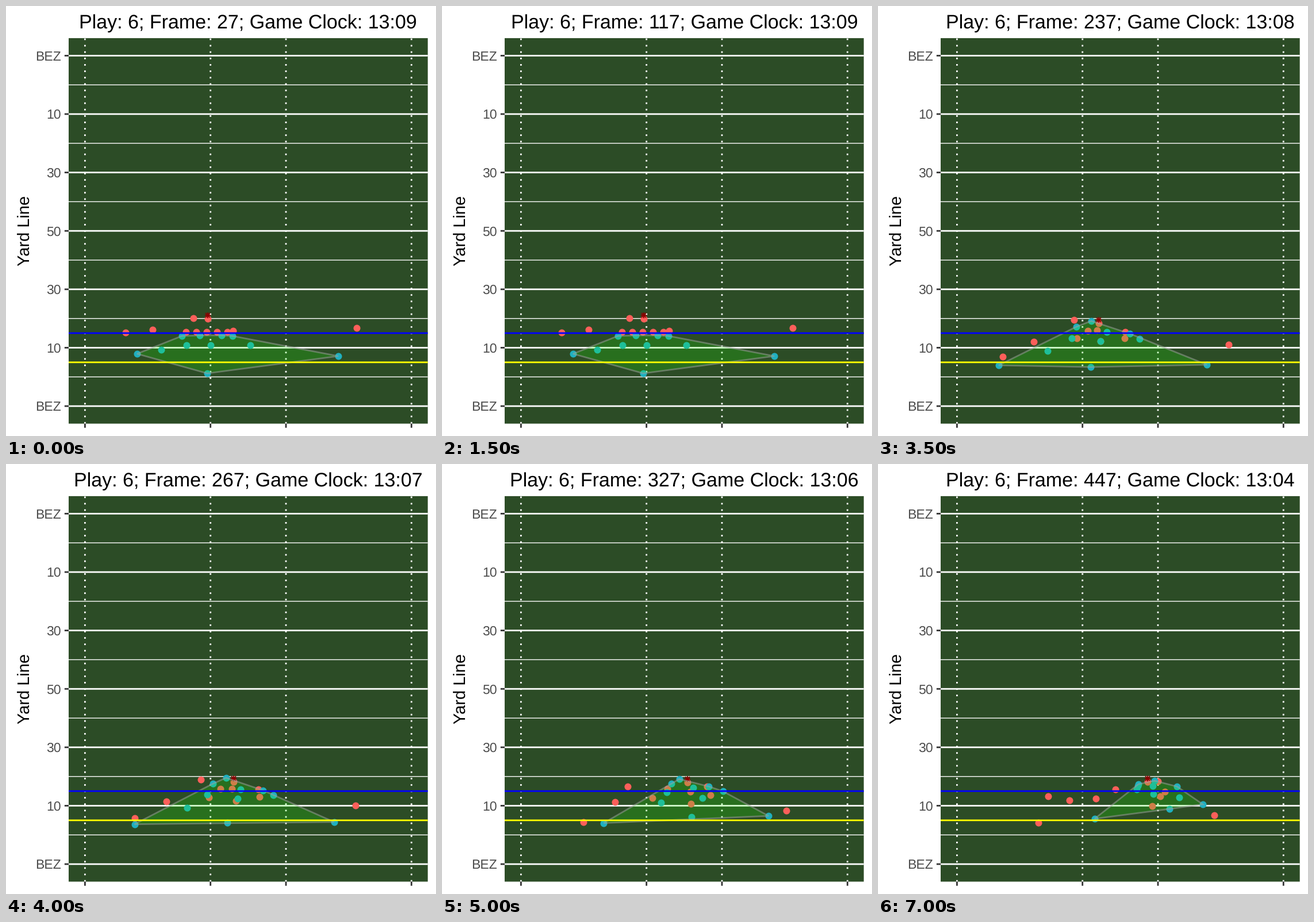
Write a matplotlib script that moves like this. It is 748 px wide and 748 px high and loops after 7.5 s.

```python
import numpy as np
import matplotlib.pyplot as plt
from matplotlib.animation import FuncAnimation
from matplotlib.patches import Polygon, Rectangle

SIZE, DPI = 748, 100
PX = 72 / DPI  # points per pixel
STEPS, INTERVAL = 15, 500

LEFT, RIGHT, TOP, BOTTOM = 109, 733.7, 55.9, 726.5
YARD = (BOTTOM - TOP) / 132  # 120 yards plus a margin of 6 at each end
WIDTH = (RIGHT - LEFT) / 1.1  # sideline to sideline
LINE, TICK = 2.78, 7.16

TURF, RED, TEAL = "#2c4c26", "#fc5f5a", "#1fb0c0"

plt.rcParams.update({"font.family": "Liberation Sans", "text.hinting": "none",
                     "text.hinting_factor": 1})

# Each route: set position, rollout, end of play
SNAP, ROLLOUT, FINISH = 3, 7, 14

QUARTERBACK = [(351, 544), (384, 552), (469, 553)]
BLOCKS = [
    [(346, 578), (379, 582)],
    [(365, 565), (413, 566)],
    [(387, 583), (477, 595)],
    [(381, 564), (491, 578)],
    [(429, 578), (499, 570)],
]
LINEMEN = [[(313 + 18 * i, 567), *block] for i, block in enumerate(BLOCKS)]
OFFENSE = LINEMEN + [
    QUARTERBACK,
    [(208, 568), (217, 610), (279, 624)],
    [(255, 563), (271, 584), (333, 585)],
    [(326, 543), (341, 546), (296, 578)],
    [(395, 565), (430, 567), (487, 552)],
    [(610, 560), (610, 589), (585, 611)],
]
DEFENSE = [
    [(306, 574), (345, 558), (452, 560)],
    [(337, 573), (371, 548), (453, 557)],
    [(375, 573), (398, 567), (478, 560)],
    [(394, 574), (438, 570), (481, 551)],
    [(425, 590), (455, 579), (520, 561)],
    [(228, 605), (210, 625), (377, 617)],
    [(270, 598), (295, 600), (479, 574)],
    [(314, 590), (337, 578), (450, 566)],
    [(356, 590), (387, 583), (524, 580)],
    [(578, 609), (572, 624), (565, 592)],
    [(350, 639), (370, 628), (507, 600)],
]


def hermite(a, b, slope_a, slope_b, span, u):
    ease = u * u * (3 - 2 * u)
    return (a + (b - a) * ease
            + span * (slope_a * u * (1 - u) ** 2 - slope_b * u * u * (1 - u)))


def positions(routes, step):
    """Hold until the snap, run through the rollout point, ease out to the end."""
    start, mid, end = np.array(routes, float).transpose(1, 0, 2)
    t1, t2 = ROLLOUT - SNAP, FINISH - ROLLOUT
    slope = ((mid - start) / t1 * t2 + (end - mid) / t2 * t1) / (t1 + t2)
    if step < ROLLOUT:
        return hermite(start, mid, 0, slope, t1, max(0, step - SNAP) / t1)
    return hermite(mid, end, slope, 0, t2, (step - ROLLOUT) / t2)


def half_hull(points):
    chain = []
    for p in points:
        while len(chain) > 1:
            a, b = chain[-2:]
            if (b[0] - a[0]) * (p[1] - a[1]) > (b[1] - a[1]) * (p[0] - a[0]):
                break
            chain.pop()
        chain.append(p)
    return chain[:-1]


def convex_hull(points):
    ordered = sorted(map(tuple, points))
    return half_hull(ordered) + half_hull(ordered[::-1])


fig = plt.figure(figsize=(SIZE / DPI, SIZE / DPI), dpi=DPI, facecolor="white")
ax = fig.add_axes([0, 0, 1, 1])
ax.set_xlim(0, SIZE)
ax.set_ylim(SIZE, 0)
ax.axis("off")


def segment(xs, ys, color, width=LINE, z=1, **kw):
    ax.plot(xs, ys, color=color, lw=width * PX, zorder=z, snap=False,
            solid_capstyle="butt", dash_capstyle="butt", **kw)


def yard_line(yard, color="white", width=LINE, z=1):
    y = BOTTOM - (yard + 6) * YARD
    segment([LEFT, RIGHT], [y, y], color, width, z)
    return y


def label(x, y, text, size, ha="center", **kw):
    return ax.text(x, y, text, size=size * PX, ha=ha, va="baseline",
                   rotation_mode="anchor", **kw)


def markers(shape, size, color, z, edge=0):
    return ax.plot([], [], shape, ms=size * PX, mew=edge * PX, color=color,
                   zorder=z, snap=False)[0]


def draw_field():
    ax.add_patch(Rectangle((LEFT, TOP), RIGHT - LEFT, BOTTOM - TOP, fc=TURF, lw=0,
                           zorder=0, snap=False))
    for yard in range(10, 120, 20):
        yard_line(yard, width=LINE / 2)
    for yard in range(0, 121, 20):
        y = yard_line(yard)
        segment([LEFT - TICK, LEFT], [y, y], "#333333")
        name = str(50 - abs(yard - 60)) if 0 < yard < 120 else "BEZ"
        label(96.1, y + 8.2, name, 22.92, ha="right", color="#4d4d4d")
    for share in (0, 0.3844, 0.6156, 1):
        x = LEFT + WIDTH * (0.05 + share)
        segment([x, x], [BOTTOM, TOP], "white", ls=(0, (1, 3)))
        segment([x, x], [BOTTOM, BOTTOM + TICK], "#333333")
    yard_line(25, "blue", z=6)
    yard_line(15, "yellow", z=6)
    label(40.5, (TOP + BOTTOM) / 2, "Yard Line", 28.65, rotation=90)


draw_field()
title = label((LEFT + RIGHT) / 2, 39.3, "", 34.38)
offense = markers("o", 12, RED, 2)
defense = markers("o", 12, TEAL, 3)
ball = [markers("x", 7.4, "darkred", 4, 1.84), markers("+", 10.4, "darkred", 4, 1.84)]
hull = Polygon([(0, 0)] * 3, fc=(0.1, 1, 0, 0.2), ec=(0.63, 0.63, 0.63, 0.5),
               lw=LINE * PX, zorder=5)
ax.add_patch(hull)


def update(step):
    second = 9 - max(0, step // 2 - 2)
    title.set_text(f"Play: 6; Frame: {27 + 30 * step}; Game Clock: 13:{second:02d}")

    defenders = positions(DEFENSE, step)
    offense.set_data(*positions(OFFENSE, step).T)
    defense.set_data(*defenders.T)
    hull.set_xy(convex_hull(defenders))

    x, y = positions([QUARTERBACK], step)[0]
    for mark in ball:
        mark.set_data([x], [y - 6])
    return [title, offense, defense, hull, *ball]


anim = FuncAnimation(fig, update, frames=STEPS, interval=INTERVAL, repeat=True, repeat_delay=0)
plt.show()
```
